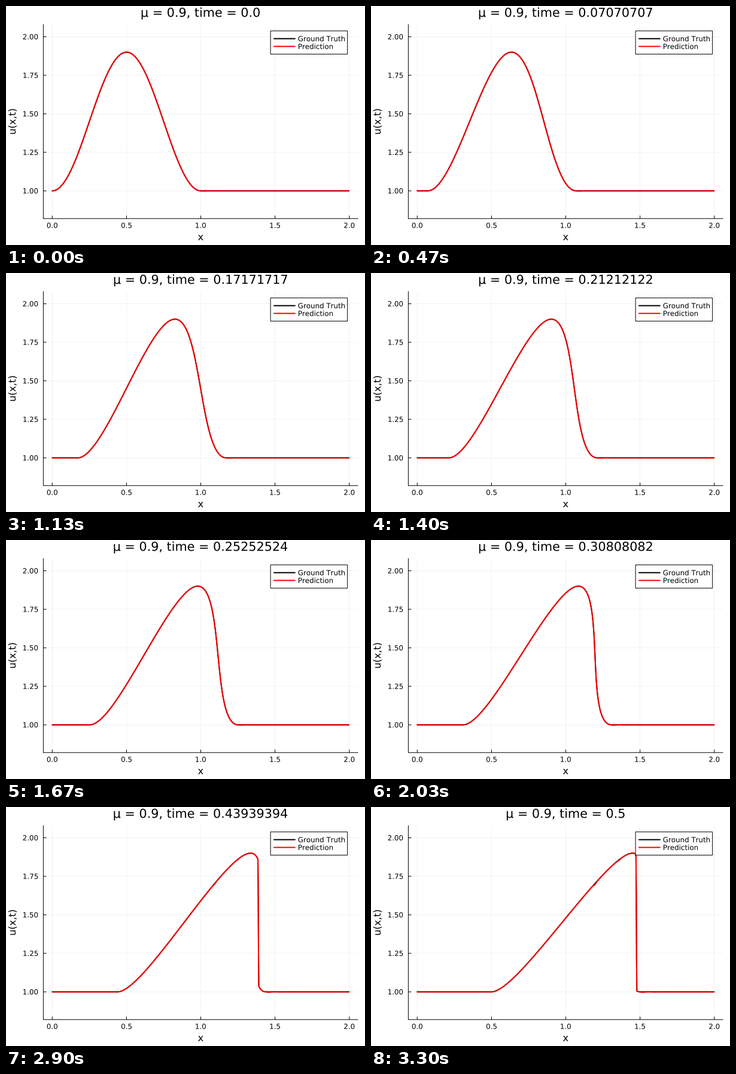
Recreate the animation shown at these times as a matplotlib script. Size 600 px wide and 400 px high, loop 3330 ms.

```python
import numpy as np
import matplotlib.pyplot as plt
from matplotlib.animation import FuncAnimation
from matplotlib.patches import PathPatch, Rectangle
from matplotlib.textpath import TextPath
from matplotlib.transforms import Affine2D

plt.rcParams.update({
    "font.family": "DejaVu Sans",
    "text.kerning_factor": 6,  # plain advances, no kerning
    "path.snap": False,
    "path.simplify": False,
})

W, H, DPI = 600, 400, 100
PT = 72 / DPI  # points per pixel
LEFT, RIGHT, TOP, BOTTOM = 62.39, 588.19, 30.87, 355.8
MID_X, MID_Y = (LEFT + RIGHT) / 2, (TOP + BOTTOM) / 2
SMALL, LABEL, TITLE = 11.85, 16.3, 20.74
TICK = 4.72

MU = 0.9
TICK_MS, LOOP_MS = 10, 3330
TIMES = np.linspace(0, 0.5, 100).astype(np.float32)
GRID = np.linspace(0, 2, 1024, endpoint=False)
START = np.linspace(-1.5, 2.5, 6001)


def px(x):
    span = GRID[-1]
    return LEFT + (x / span + 0.03) / 1.06 * (RIGHT - LEFT)


def py(u):
    low, high = 1 - 0.2 * MU, 1 + 1.2 * MU
    return BOTTOM - (u - low) / (high - low) * (BOTTOM - TOP)


def initial(x):
    bump = 1 + MU / 2 * (1 - np.cos(2 * np.pi * x))
    return np.where((x > 0) & (x < 1), bump, 1.0)


U0 = initial(START)


def burgers(t):
    """Inviscid Burgers solution by characteristics with a symmetric shock."""
    moved = START + U0 * t
    shock = 0.75 + (1 + MU / 2) * t
    keep = ((START < 0.75) & (moved < shock)) | ((START > 0.75) & (moved > shock))
    u = np.interp(GRID, moved[keep], U0[keep])
    return np.convolve(np.pad(u, 1, mode="edge"), [0.25, 0.5, 0.25], "valid")


def model_error(t):
    """Ripple behind the foot of the wave and late dents on its slope."""
    d = np.maximum(GRID - 1 - t, 0)
    ripple = -(0.0015 + 0.006 * t) * np.sin(75 * d) * np.exp(-22 * d)
    growth = max(0.0, (t - 0.3) / 0.2) ** 2
    for x0, depth in ((0.345, 0.007), (0.43, 0.004)):
        centre = x0 + initial(x0) * t
        ripple -= growth * depth * np.exp(-((GRID - centre) / 0.012) ** 2)
    return ripple


fig = plt.figure(figsize=(W / DPI, H / DPI), dpi=DPI, facecolor="white")
ax = fig.add_axes([0, 0, 1, 1])
ax.set_xlim(0, W)
ax.set_ylim(H, 0)
ax.axis("off")


def line(xs, ys, width=1.0, color="black", **kw):
    return ax.plot(xs, ys, color=color, lw=width * PT,
                   solid_capstyle="round", solid_joinstyle="round", **kw)[0]


def outline(x, y, s, size, anchor=0.5, angle=0):
    """Glyph outlines on a baseline; anchor 0, 0.5, 1 = left, centre, right."""
    path = TextPath((0, 0), s, size=size)
    box = path.get_extents()
    shift = -anchor * (box.x0 + box.x1) if anchor == 0.5 else -anchor * box.x1
    place = Affine2D().translate(shift, 0).scale(1, -1).rotate_deg(angle)
    return place.translate(x, y).transform_path(path)


def text(*args, zorder=3, **kw):
    patch = PathPatch(outline(*args, **kw), fc="black", lw=0, zorder=zorder)
    return ax.add_patch(patch)


def grid_line(xs, ys):
    line(xs, ys, 0.5, alpha=0.1, zorder=1)


for v in (0, 0.5, 1, 1.5, 2):
    x = px(v)
    grid_line([x, x], [TOP, BOTTOM])
    line([x, x], [BOTTOM, BOTTOM - TICK], zorder=2)
    text(x, 371.4, f"{v:.1f}", SMALL)

for v in (1, 1.25, 1.5, 1.75, 2):
    y = py(v)
    grid_line([LEFT, RIGHT], [y, y])
    line([LEFT, LEFT + TICK], [y, y], zorder=2)
    text(53.2, y + 4.32, f"{v:.2f}", SMALL, anchor=1)

line([LEFT, LEFT], [TOP, BOTTOM], zorder=2)
line([LEFT, RIGHT], [BOTTOM, BOTTOM], zorder=2)
text(MID_X, 392, "x", LABEL)
text(16, MID_Y, "u(x,t)", LABEL, angle=-90)
title = text(MID_X, 18.14, "μ", TITLE)

truth = line([], [], 2, zorder=3)
prediction = line([], [], 2, "red", zorder=4)

ax.add_patch(Rectangle((442.1, 41.7), 128.56, 38.88, fc="white", ec="black",
                       lw=PT, zorder=5))
for y, color, name in ((54.66, "black", "Ground Truth"),
                       (67.62, "red", "Prediction")):
    line([447.94, 482.99], [y, y], 2, color, zorder=6)
    text(487.8, y + 4.32, name, SMALL, anchor=0, zorder=6)


def update(tick):
    now = TIMES[(3 * tick + 1) // 10]
    t = float(now)
    u = burgers(t)
    truth.set_data(px(GRID), py(u))
    prediction.set_data(px(GRID), py(u + model_error(t)))
    title.set_path(outline(MID_X, 18.14, f"μ = {MU}, time = {str(now)}", TITLE))
    return truth, prediction, title


anim = FuncAnimation(fig, update, frames=LOOP_MS // TICK_MS,
                     interval=TICK_MS, repeat=True, repeat_delay=0)
plt.show()
```
